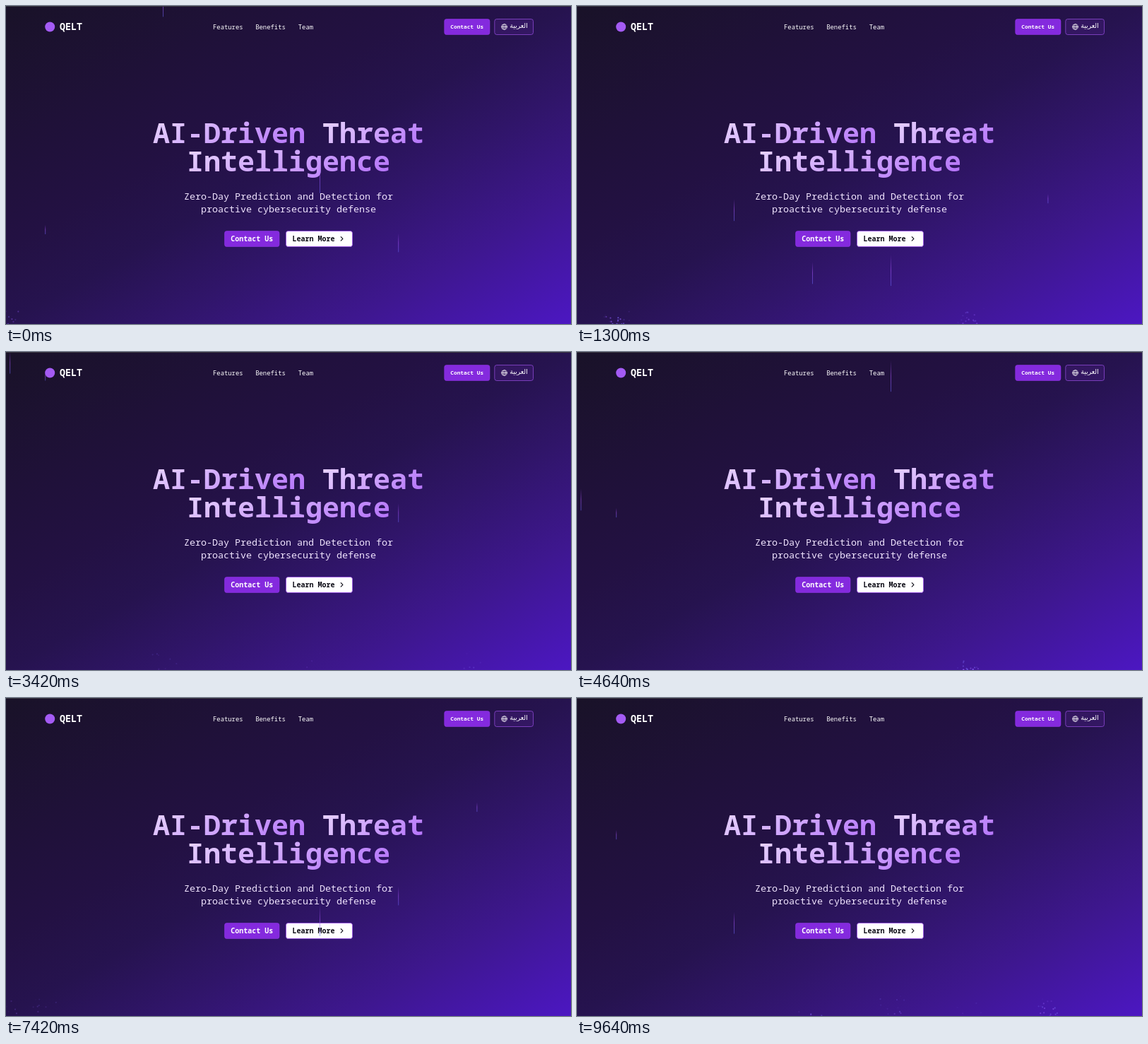
Recreate the animation shown at these times as an HTML page with a canvas. Size 800 px wide and 450 px high, loop 9670 ms.

```html
<!DOCTYPE html>
<html lang="en">
<head>
<meta charset="utf-8">
<title>Threat Intelligence</title>
<style>
  html, body { margin: 0; width: 100%; height: 100%; overflow: hidden; }
  body {
    position: relative;
    background: linear-gradient(to bottom right,
      #191228 0%, #1f1138 22%, #231143 38%, #26134f 50%, #301569 63%, #3e178f 80%, #4c17c2 100%);
  }
  svg, canvas { position: absolute; left: 0; top: 0; width: 800px; height: 450px; }
  text { font-family: "Noto Sans Mono", "DejaVu Sans Mono", monospace; fill: #fff; white-space: pre; }
  .middle { text-anchor: middle; }
  .title { font-size: 40px; font-weight: 700; fill: url(#titleFill); }
  .lead { font-size: 13.333px; fill: #f0e4fe; }
  .action { font-size: 10px; font-weight: 600; }
  .brand { font-size: 13.333px; font-weight: 800; }
  .nav { font-size: 8.889px; font-weight: 500; }
  .small { font-size: 7.8px; font-weight: 600; }
  .arabic { font-family: "DejaVu Sans", sans-serif; font-size: 9.4px; }
  .button { fill: #842ade; stroke: #9336ea; stroke-width: .56; }
  .line { fill: none; stroke-linecap: round; stroke-linejoin: round; }
</style>
</head>
<body>
<svg viewBox="0 0 800 450">
  <defs>
    <linearGradient id="titleFill" x1="0" y1=".3" x2="1" y2=".7">
      <stop stop-color="#e6d0fe"/>
      <stop offset="1" stop-color="#b676fa"/>
    </linearGradient>
  </defs>
  <text class="title middle" x="316" y="194.2">AI-Driven</text>
  <text class="title middle" x="520" y="194.2">Threat</text>
  <text class="title middle" x="400" y="234.2">Intelligence</text>
  <text class="lead middle" x="400" y="274">Zero-Day Prediction and Detection for</text>
  <text class="lead middle" x="400" y="291.8">proactive cybersecurity defense</text>
  <rect class="button" x="309.5" y="318.5" width="77.5" height="22" rx="3.1"/>
  <text class="action middle" x="348.2" y="333">Contact Us</text>
  <rect x="396.5" y="318.5" width="94" height="22" rx="3.1" fill="#fff" stroke="#9d48ef" stroke-width=".7"/>
  <text class="action" x="405.5" y="333" style="fill:#0b0a14">Learn More</text>
  <path class="line" d="M474.2 326.6l2.7 2.8-2.7 2.8" stroke="#0b0a14" stroke-width="1.1"/>
</svg>

<canvas id="beams" width="800" height="450"></canvas>

<svg viewBox="0 0 800 450">
  <rect width="800" height="1" fill="#3b3842"/>
  <circle cx="62.2" cy="29.5" r="7" fill="#a45bf4"/>
  <text class="brand" x="76" y="34.2">QELT</text>
  <text class="nav" x="293" y="32.5">Features</text>
  <text class="nav" x="353.2" y="32.5">Benefits</text>
  <text class="nav" x="413.8" y="32.5">Team</text>
  <rect class="button" x="620.7" y="18.5" width="64.3" height="22" rx="3.1"/>
  <text class="small middle" x="652.7" y="32.2">Contact Us</text>
  <rect x="691.8" y="18.5" width="54.7" height="22" rx="3.1" fill="rgba(147,51,234,.12)" stroke="#9a50e4" stroke-width=".7"/>
  <g class="line" stroke="#fff" stroke-width=".8">
    <circle cx="705.5" cy="29.5" r="3.8"/>
    <ellipse cx="705.5" cy="29.5" rx="1.6" ry="3.8"/>
    <path d="M701.7 29.5h7.6"/>
  </g>
  <text class="arabic middle" x="726" y="30.6">العربية</text>
</svg>

<script>
const LOOP = 9.67;
const SCALE = 800 / 1440;      // layout pixels to stage pixels
const FLOOR = 450;
const TRAVEL = 2000 * SCALE;
const START_TOP = -120 * SCALE;
const HIT_DELAY = 0.035;       // a hit registers slightly after the beam crosses the floor
const SPARKS = 20;

// x and length in layout pixels, fall duration and launch times in seconds
const beams = [
  { x: 10, length: 56, duration: 7, launches: [-4.06, 3.004] },
  { x: 100, length: 24, duration: 7, launches: [-2.37, 2.83, 8.044] },
  { x: 400, length: 56, duration: 5, launches: [-0.228, 7.98] },
  { x: 600, length: 56, duration: 3, launches: [0.143, 7.48] },
  { x: 800, length: 80, duration: 11, launches: [-2.84, 3.865] },
  { x: 1000, length: 48, duration: 4, launches: [-1.397, 2.41, 6.221] },
  { x: 1200, length: 24, duration: 6, launches: [-0.495, 6.263] }
];

const ctx = document.getElementById("beams").getContext("2d");

function randomFrom(seed) {
  return () => {
    seed = (seed * 1664525 + 1013904223) >>> 0;
    return seed / 4294967296;
  };
}

function drawBeam(x, top, length) {
  const fill = ctx.createLinearGradient(0, top, 0, top + length);
  fill.addColorStop(0, "rgba(168,85,247,0)");
  fill.addColorStop(0.5, "#a855f7");
  fill.addColorStop(1, "#6366f1");
  ctx.fillStyle = fill;
  ctx.fillRect(x, top, SCALE, length);
}

function drawSparks(x, y, age, seed) {
  const random = randomFrom(seed);
  for (let i = 0; i < SPARKS; i++) {
    const dx = (random() * 80 - 40) * SCALE;
    const dy = (-random() * 50 - 10) * SCALE;
    const life = 0.5 + random() * 1.5;
    if (age >= life) continue;
    const left = 1 - age / life;
    const spread = 1 - left ** 1.67;
    ctx.globalAlpha = left ** 1.2;
    ctx.fillStyle = i % 2 ? "#7a62f3" : "#9059f5";
    ctx.beginPath();
    ctx.arc(x + dx * spread, y + dy * spread, 2 * SCALE, 0, 2 * Math.PI);
    ctx.fill();
  }
  ctx.globalAlpha = 1;
}

function draw(time) {
  ctx.clearRect(0, 0, 800, FLOOR);
  beams.forEach((beam, b) => {
    const x = beam.x * SCALE;
    const length = beam.length * SCALE;
    const speed = TRAVEL / beam.duration;
    const fall = (FLOOR - START_TOP - length) / speed;
    beam.launches.forEach((launch, n) => {
      const elapsed = time - launch;
      const top = START_TOP + speed * elapsed;
      if (elapsed > 0 && top < FLOOR) drawBeam(x, top, length);
      const age = elapsed - fall - HIT_DELAY;
      if (age > 0 && age < 2) {
        drawSparks(x - 1.1, FLOOR + speed * HIT_DELAY - 1.1, age, 7919 * (b + 1) + 104729 * (n + 1));
      }
    });
  });
}

function frame() {
  draw(performance.now() / 1000 % LOOP);
  requestAnimationFrame(frame);
}
frame();
</script>
</body>
</html>
```
